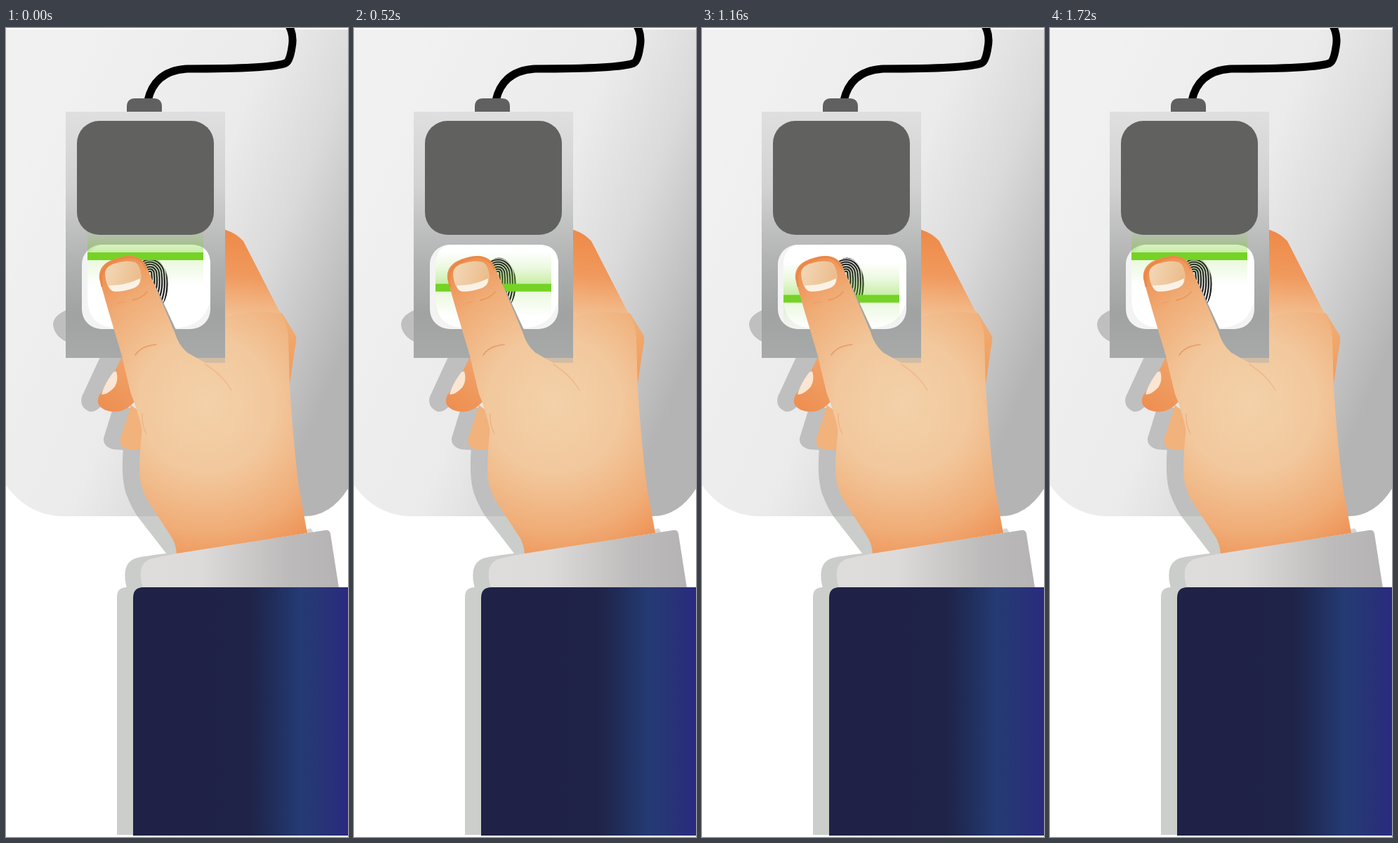
An HTML page that plays this animation: 487 by 1150 pixels, repeating every 1.96 s.

```html
<!DOCTYPE html>
<html lang="en">
<head>
<meta charset="utf-8">
<title>Fingerprint scan</title>
<style>
html, body { margin: 0; width: 100%; height: 100%; overflow: hidden; background: #fff; }
svg { display: block; width: 100%; height: 100%; }
</style>
</head>
<body>
<svg viewBox="0 0 487 1150" preserveAspectRatio="xMinYMin meet">
  <defs>
    <linearGradient id="table" gradientUnits="userSpaceOnUse" x1="0" y1="230" x2="490" y2="440">
      <stop offset="0" stop-color="#f1f1f1"/>
      <stop offset=".5" stop-color="#ebebeb"/>
      <stop offset=".72" stop-color="#dadada"/>
      <stop offset="1" stop-color="#b4b4b4"/>
    </linearGradient>
    <linearGradient id="case" x2="0" y2="1">
      <stop offset="0" stop-color="#dfdfe0"/>
      <stop offset=".3" stop-color="#d2d2d3"/>
      <stop offset=".62" stop-color="#b0b1b1"/>
      <stop offset=".82" stop-color="#a0a3a2"/>
      <stop offset="1" stop-color="#a7aaa9"/>
    </linearGradient>
    <radialGradient id="skin" gradientUnits="userSpaceOnUse" cx="285" cy="535" r="240">
      <stop offset="0" stop-color="#f3d1a9"/>
      <stop offset=".4" stop-color="#f2c89d"/>
      <stop offset=".75" stop-color="#f0ad77"/>
      <stop offset="1" stop-color="#ee8f51"/>
    </radialGradient>
    <linearGradient id="index" gradientUnits="userSpaceOnUse" x1="345" y1="295" x2="335" y2="412">
      <stop offset="0" stop-color="#ee8b4a"/>
      <stop offset=".5" stop-color="#f09a5e"/>
      <stop offset="1" stop-color="#f3c194"/>
    </linearGradient>
    <linearGradient id="knuckle" gradientUnits="userSpaceOnUse" x1="398" y1="405" x2="410" y2="505">
      <stop offset="0" stop-color="#f1ae74"/>
      <stop offset="1" stop-color="#f09c5c"/>
    </linearGradient>
    <linearGradient id="finger" gradientUnits="userSpaceOnUse" x1="140" y1="545" x2="190" y2="480">
      <stop offset="0" stop-color="#ee8e50"/>
      <stop offset="1" stop-color="#f0a46b"/>
    </linearGradient>
    <linearGradient id="nail" x2="1" y2=".25">
      <stop offset="0" stop-color="#f3d9b9"/>
      <stop offset="1" stop-color="#ebbd8c"/>
    </linearGradient>
    <linearGradient id="cuff" x2="1">
      <stop offset="0" stop-color="#dedddc"/>
      <stop offset=".3" stop-color="#dddbda"/>
      <stop offset=".75" stop-color="#bcbaba"/>
      <stop offset="1" stop-color="#b5b3b3"/>
    </linearGradient>
    <linearGradient id="sleeve" x2="1">
      <stop offset="0" stop-color="#1f2246"/>
      <stop offset=".54" stop-color="#1f2347"/>
      <stop offset=".64" stop-color="#202c58"/>
      <stop offset=".78" stop-color="#243b74"/>
      <stop offset=".9" stop-color="#283377"/>
      <stop offset="1" stop-color="#2a2a80"/>
    </linearGradient>
    <linearGradient id="glowUp" x1="0" y1="1" x2="0" y2="0">
      <stop offset="0" stop-color="#74d31f" stop-opacity=".4"/>
      <stop offset=".5" stop-color="#74d31f" stop-opacity=".14"/>
      <stop offset="1" stop-color="#74d31f" stop-opacity="0"/>
    </linearGradient>
    <linearGradient id="glowDown" x2="0" y2="1">
      <stop offset="0" stop-color="#74d31f" stop-opacity=".15"/>
      <stop offset="1" stop-color="#74d31f" stop-opacity="0"/>
    </linearGradient>
    <clipPath id="printClip"><ellipse cx="206" cy="365" rx="25" ry="38.5"/></clipPath>
  </defs>

  <path fill="url(#table)" d="M0 2H487V655Q462 694 425 694H82C45 694 18 675 0 650Z"/>

  <!-- shadows on the table -->
  <g fill="#bfbfbf">
    <path d="M86 401Q67 409 67 422Q69 438 86 446Z"/>
    <path d="M134 468L108 524Q104 538 118 545Q126 547 134 539L150 537L180 468Z"/>
    <path d="M153 538L139 583Q138 595 153 599L168 600L180 540Z"/>
    <path d="M167 596Q163 645 173 667Q179 682 187 694H230L205 590Z"/>
  </g>
  <path fill="#cbcdca" d="M187 694L229 748H260L220 694Z"/>
  <path fill="#cbcdca" d="M172 796Q163 762 184 754Q192 751 244 745V796Z"/>
  <path fill="#cccecb" d="M158 1147V809Q158 795 172 795H200V1147Z"/>
  <path fill="#d6d6d5" d="M428 713L434 711L438 718H428Z"/>

  <!-- cable and plug -->
  <path fill="none" stroke="#000" stroke-width="11" d="M403 -3C409 8 409 18 407 28Q404 48 398 50C380 57 300 58 258 58C222 60 207 80 202 103"/>
  <path fill="#606060" d="M172 120V112Q172 100 184 100H210Q222 100 222 112V120Z"/>

  <!-- back of the hand -->
  <path fill="url(#knuckle)" d="M385 400L394 407L413 438Q414 446 411 458L404 506L390 480Z"/>
  <path fill="url(#finger)" d="M166 466L150 497L133 522Q126 536 141 543Q160 550 176 538L195 520V466Z"/>
  <path fill="#fae6d2" d="M153 489L157 488Q161 501 154 511Q145 521 136 521Q140 506 153 489Z"/>
  <path fill="#f1b27c" d="M178 536L163 583Q160 597 175 599L194 600L210 560Z"/>
  <path fill="url(#skin)" d="M300 398L391 405Q402 423 402 440L404 510Q409 590 417 652L429 718L243 748Q242 732 234 721L203 674Q190 652 190 630Q190 600 194 570Q186 540 178 520L165 466H300Z"/>
  <path fill="url(#index)" d="M300 287H313Q328 292 338 303L391 406Q345 398 300 416Z"/>

  <!-- scanner -->
  <path fill="url(#case)" d="M85 119H312V469H85Z"/>
  <path fill="#cbb9a5" opacity=".8" d="M267 469H312V476H280Z"/>
  <rect x="108" y="308" width="183" height="120" rx="28" fill="#f3f3f3"/>
  <path fill="#fff" d="M136 308H263Q291 308 291 336V385Q285 421 248 426H150Q117 421 116 386V336Q116 313 136 308Z"/>
  <g id="print" clip-path="url(#printClip)" fill="none" stroke="#222" stroke-width="2.3"/>
  <g id="beam">
    <rect x="116" y="-52" width="165" height="47" fill="url(#glowUp)"/>
    <rect x="116" y="5" width="165" height="36" fill="url(#glowDown)"/>
    <rect x="116" y="-5.5" width="165" height="11" fill="#74d325"/>
  </g>
  <rect x="101" y="132" width="195" height="162" rx="32" fill="#61615f"/>

  <!-- thumb -->
  <path fill="#a3a5a3" d="M198 340L217 375L242 429L247 446L235 440Z"/>
  <path fill="url(#skin)" d="M133 357C131 335 149 329 166 325C185 321 196 328 201 341L212 366L240 432Q246 452 259 462L284 476L260 570L194 575Q190 545 178 520L165 466L147 406Z"/>
  <path fill="none" stroke="#e98440" stroke-width="3" opacity=".65" d="M137 368C130 340 149 332 166 327C184 323 194 329 200 343"/>
  <path fill="url(#nail)" d="M141 350Q141 339 154 335Q172 329 184 333Q191 337 193 352Q193 365 181 370Q162 376 152 374Q143 370 141 350Z"/>
  <path fill="#fbf2e6" d="M146 366Q171 366 191 356Q192 366 181 370Q162 376 152 374Q147 371 146 366Z"/>
  <g fill="none" stroke="#e78b4f" stroke-linecap="round">
    <path stroke-width="1.6" opacity=".7" d="M184 465Q192 452 214 450"/>
    <path stroke-width="1.8" opacity=".6" d="M180 387Q194 384 201 375"/>
    <path stroke-width="1.2" opacity=".4" d="M160 391L170 389"/>
    <path stroke-width="1.5" opacity=".3" d="M284 478Q310 495 321 515"/>
    <path stroke-width="1.4" opacity=".35" d="M194 548Q193 565 200 577"/>
  </g>

  <!-- cuff and sleeve -->
  <path fill="url(#cuff)" d="M195 796Q184 760 209 754Q225 750 243 747L454 714Q461 713 462 719L474 796Z"/>
  <path fill="url(#sleeve)" d="M181 1148V810Q181 795 196 795H487V1148Z"/>
</svg>
<script>
const LOOP = 1960, STEP = 40;
const TOP = 324.5, TRAVEL = 82.5;
const START = 3, TURN = 22, FALL = 20.2;
const beam = document.getElementById('beam');

// Nested arches whose right ends bend back towards the thumb
function ridge(r) {
  const x = 205, y = 348 + r * .12, w = r * .9;
  const end = 380 + r * .75;
  return `<path d="M${x - w} ${y + 30}V${y}A${w} ${r * .95} 0 0 1 ${x + w} ${y}` +
    `C${x + w + 2} ${y + 18} ${x + w} ${end - 14} ${x + w - 11} ${end + 8}"/>`;
}
document.getElementById('print').innerHTML =
  Array.from({ length: 10 }, (_, i) => ridge(2.5 + i * 4)).join('');

const ease = p => (1 - Math.cos(Math.PI * Math.max(0, Math.min(1, p)))) / 2;

function draw(time) {
  const n = Math.floor((time % LOOP) / STEP);
  const p = n < TURN ? (n - START) / (TURN - START) : 1 - (n - TURN) / FALL;
  beam.setAttribute('transform', `translate(0 ${(TOP + TRAVEL * ease(p)).toFixed(2)})`);
}

const origin = performance.now();
function tick() {
  draw(performance.now() - origin);
  requestAnimationFrame(tick);
}
tick();
</script>
</body>
</html>
```
